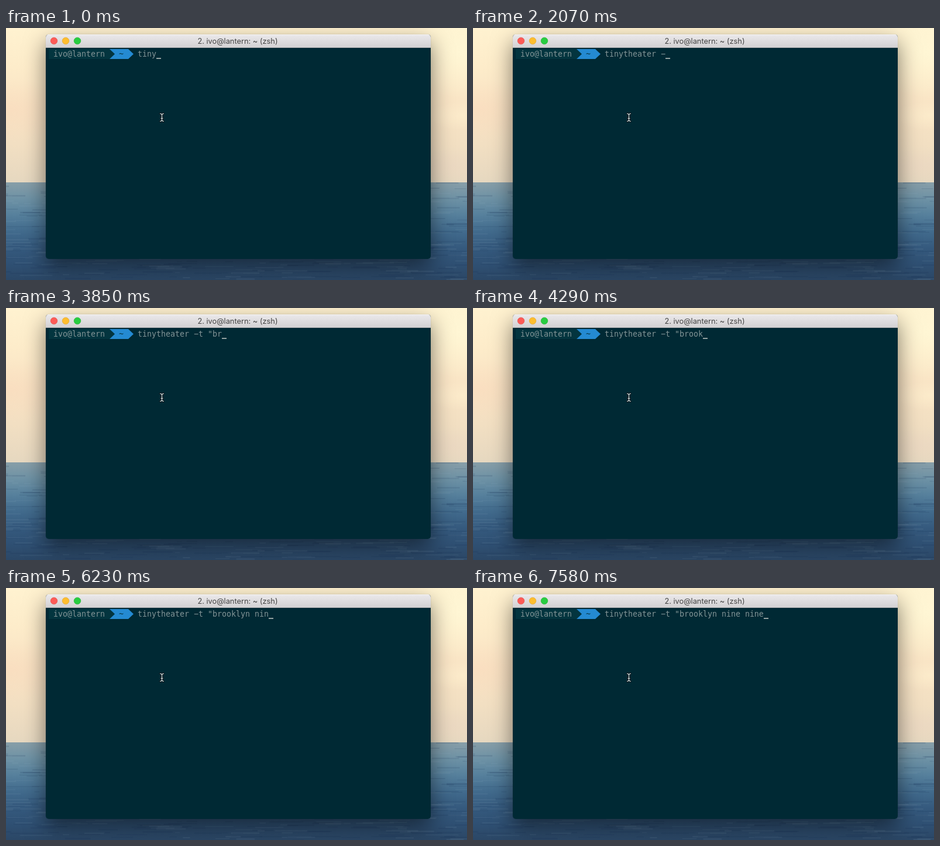
Recreate the animation shown at these times as an HTML page with a canvas. Size 788x431 px, loop 8 s.

```html
<!DOCTYPE html>
<html lang="en">
<head>
<meta charset="utf-8">
<title>Terminal typing</title>
<style>
  html, body { margin: 0; width: 100%; height: 100%; overflow: hidden; background: #2b4766; }
  canvas, svg, .shadow { position: absolute; left: 0; top: 0; display: block; }
  .shadow {
    left: 68px; top: 11px; width: 658px; height: 384px; border-radius: 5px;
    box-shadow: 0 14px 36px rgba(0, 0, 0, .5), 0 0 1px rgba(0, 0, 0, .4);
  }
  .mono { font: 13.29px "DejaVu Sans Mono", monospace; fill: #839496; }
  .title { font: 12.8px Inter, sans-serif; fill: #444; text-anchor: middle; }
</style>
</head>
<body>
<canvas id="backdrop" width="788" height="431"></canvas>
<div class="shadow"></div>
<svg width="788" height="431" viewBox="0 0 788 431">
  <defs>
    <linearGradient id="bar" x2="0" y2="1">
      <stop stop-color="#ebe9eb"/>
      <stop offset="1" stop-color="#d2d0d2"/>
    </linearGradient>
    <clipPath id="frame"><rect x="68" y="11" width="658" height="384" rx="5"/></clipPath>
  </defs>
  <g clip-path="url(#frame)">
    <rect x="68" y="11" width="658" height="384" fill="#002934"/>
    <rect x="68" y="11" width="658" height="23" fill="url(#bar)"/>
    <rect x="68" y="11" width="658" height="1" fill="#f5f4f5"/>
    <rect x="68" y="33" width="658" height="1" fill="#b4b3b4"/>
  </g>
  <g stroke-width=".6">
    <circle cx="82" cy="22" r="5.8" fill="#fc5b57" stroke="#df4744"/>
    <circle cx="102" cy="22" r="5.8" fill="#fdbe2f" stroke="#dfa023"/>
    <circle cx="122" cy="22" r="5.8" fill="#28cd41" stroke="#1dac2b"/>
  </g>
  <text class="title" x="396" y="27">2. ivo@lantern: ~ (zsh)</text>

  <path d="M73 36H177L186 44.5L177 53H73Z" fill="#03353f"/>
  <path d="M177 36H209L218 44.5L209 53H177L186 44.5Z" fill="#248ad2"/>
  <text class="mono" x="81" y="49">ivo@lantern</text>
  <text class="mono" x="193" y="49" style="fill:#073642">~</text>
  <text class="mono" x="225" y="49" id="typed"></text>
  <rect id="caret" y="51" width="8" height="2" fill="#93a1a1"/>

  <g fill="none" stroke-linecap="round">
    <path id="beam" d="M263.5 146.5Q266.5 146.5 266.5 149V157Q266.5 159.5 263.5 159.5M269.5 146.5Q266.5 146.5 266.5 149M266.5 157Q266.5 159.5 269.5 159.5M265 154.5H268" stroke="#001318" stroke-width="2.6"/>
    <use href="#beam"/>
    <path d="M263.5 146.5Q266.5 146.5 266.5 149V157Q266.5 159.5 263.5 159.5M269.5 146.5Q266.5 146.5 266.5 149M266.5 157Q266.5 159.5 269.5 159.5M265 154.5H268" stroke="#e8eeee" stroke-width="1.1"/>
  </g>
</svg>
<script>
const LOOP = 8000, CELL = 8, TEXT_X = 225;
const COMMAND = 'tinytheater \u2212t "brooklyn nine nine';

// [time in ms, number of characters typed so far]
const KEYS = [
  [0, 4], [440, 5], [590, 7], [880, 8],
  [1180, 9], [1330, 10], [1480, 11], [1630, 12],
  [2070, 13], [2220, 14], [2360, 15], [2810, 16],
  [3560, 17], [3850, 18], [4000, 19], [4150, 20], [4290, 21],
  [4890, 22], [5190, 23], [5330, 24],
  [5780, 25], [5930, 26], [6080, 27], [6230, 28], [6380, 29],
  [6680, 30], [7130, 31], [7430, 32], [7580, 34]
];

const typed = document.getElementById('typed');
const caret = document.getElementById('caret');

function paintBackdrop() {
  const ctx = document.getElementById('backdrop').getContext('2d');
  const HORIZON = 264;
  let seed = 7;
  const random = () => (seed = seed * 16807 % 2147483647) / 2147483647;

  function band(top, bottom, colors) {
    const gradient = ctx.createLinearGradient(0, top, 0, bottom);
    colors.forEach((color, i) => gradient.addColorStop(i / (colors.length - 1), color));
    ctx.fillStyle = gradient;
    ctx.fillRect(0, top, 788, bottom - top);
  }

  function cloud(x, y, rx, ry, rgb, alpha) {
    ctx.save();
    ctx.translate(x, y);
    ctx.scale(rx, ry);
    const glow = ctx.createRadialGradient(0, 0, 0, 0, 0, 1);
    glow.addColorStop(0, `rgba(${rgb},${alpha})`);
    glow.addColorStop(1, `rgba(${rgb},0)`);
    ctx.fillStyle = glow;
    ctx.fillRect(-1, -1, 2, 2);
    ctx.restore();
  }

  band(0, HORIZON, ['#fff2d0', '#fdecca', '#f9e4c5', '#f2dfc2', '#e6d8c0']);
  cloud(10, 140, 90, 55, '250,218,188', .55);
  cloud(775, 40, 90, 80, '255,248,214', .8);
  cloud(780, 150, 60, 25, '255,240,206', .6);
  cloud(765, 235, 80, 30, '236,214,194', .5);

  band(HORIZON, 431, ['#879ea8', '#6e92a5', '#56809c', '#426b8d', '#355a7e', '#2f5073', '#2b4766']);
  for (let i = 0; i < 520; i++) {
    const y = HORIZON + random() * 167;
    const length = 8 + random() * 50;
    const light = random() < .5;
    ctx.fillStyle = light ? 'rgba(150,180,190,.10)' : 'rgba(20,45,80,.13)';
    ctx.fillRect(random() * 828 - 40, y, length, 1 + random() * 1.5);
  }
}

function render(now) {
  const time = now % LOOP;
  const count = KEYS.findLast(([start]) => start <= time)[1];
  typed.textContent = COMMAND.slice(0, count);
  caret.setAttribute('x', TEXT_X + count * CELL);
}

paintBackdrop();
render(0);
const start = performance.now();
(function tick() {
  render(performance.now() - start);
  requestAnimationFrame(tick);
})();
</script>
</body>
</html>
```
